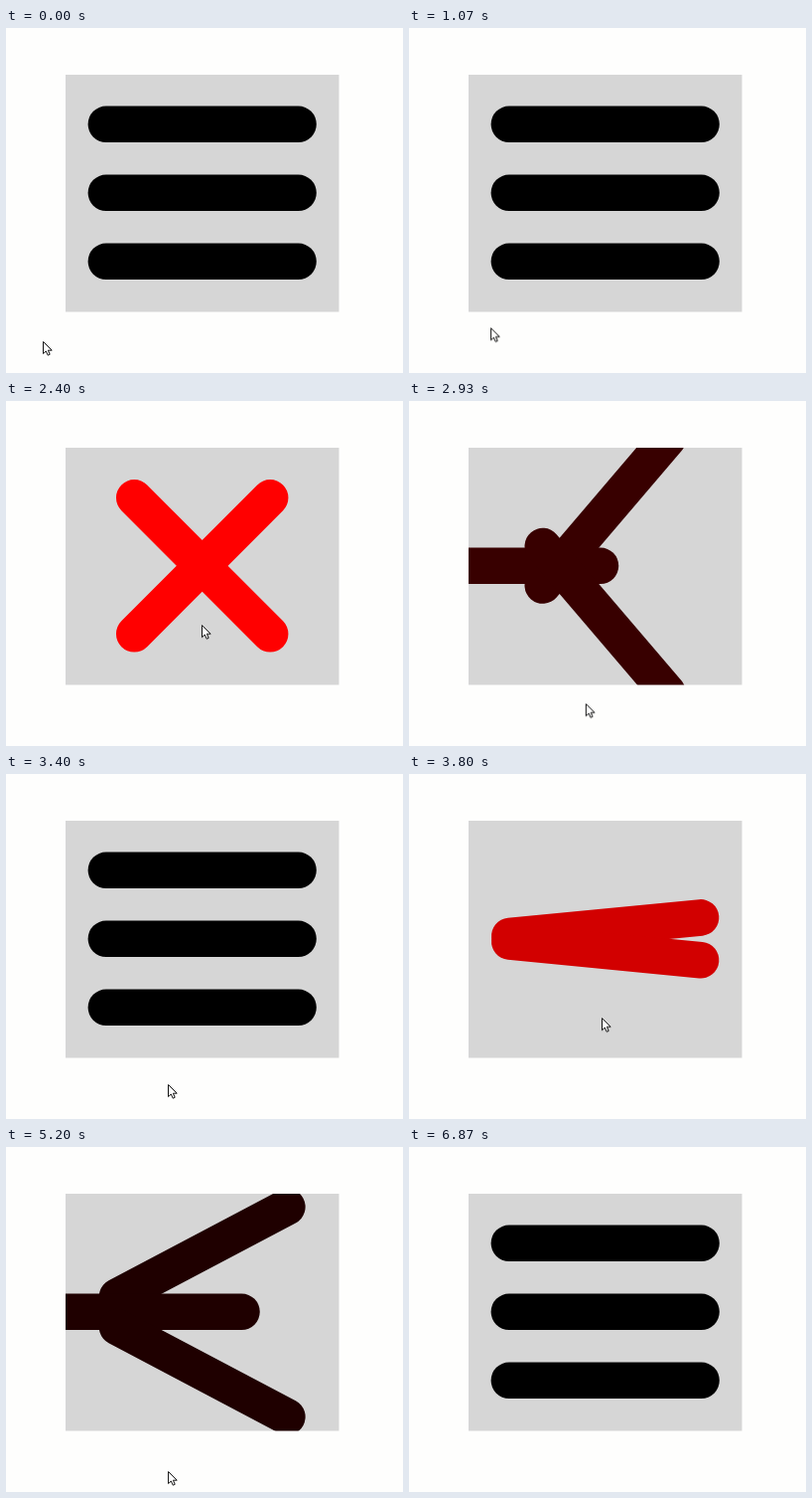
These frames come from a looping animation (400 px wide and 347 px high, 6940 ms). An HTML page:

```html
<!DOCTYPE html>
<html lang="en">
<head>
<meta charset="utf-8">
<title>Menu icon</title>
<style>
  /* 0 = menu bars, 1 = cross */
  @property --p { syntax: "<number>"; inherits: true; initial-value: 0; }

  html, body { margin: 0; width: 100%; height: 100%; overflow: hidden; background: #fefefd; }
  svg { display: block; width: 400px; height: 347px; }

  .icon { animation: toggle 6940ms infinite paused; stroke: rgb(calc(var(--p) * 255), 0, 0); }
  .bar { stroke-width: 36.6px; stroke-linecap: round; }
  .top { transform: translateY(calc(-69px + var(--p) * 69px)) rotate(calc(var(--p) * -225deg)); }
  .middle { transform: translateX(calc(var(--p) * -462px)); }
  .bottom { transform: translateY(calc(69px - var(--p) * 69px)) rotate(calc(var(--p) * 225deg)); }

  /* each change takes 300 ms and swings past both ends */
  @keyframes toggle {
    0%, 3.46%, 13.26%, 16.98%, 44.52%, 52.49%, 76.71%, 100% { --p: 0; }
    7.78%, 8.93%, 21.3%, 40.2%, 56.82%, 72.39% { --p: 1; }
    3.46%, 8.93%, 16.98%, 40.2%, 52.49%, 72.39% {
      animation-timing-function: cubic-bezier(.68, -.55, .265, 1.55);
    }
  }

  .cursor { animation: roam 6940ms linear infinite paused; }
  @keyframes roam {
    0%, 1.01% { transform: translate(37px, 315px); }
    3.46% { transform: translate(62px, 283px); }
    6.2% { transform: translate(72px, 268px); }
    8.93% { transform: translate(58px, 287px); }
    11.53% { transform: translate(37px, 321px); }
    14.41% { transform: translate(60px, 312px); }
    16.93% { transform: translate(118px, 284px); }
    19.2% { transform: translate(183px, 236px); }
    21.61%, 34.58% { transform: translate(197px, 225px); }
    38.9% { transform: translate(190px, 270px); }
    40.2% { transform: translate(185px, 287px); }
    42.22% { transform: translate(178px, 304px); }
    44.67% { transform: translate(165px, 315px); }
    48.99%, 51.44% { transform: translate(163px, 312px); }
    52.49% { transform: translate(178px, 284px); }
    54.76% { transform: translate(194px, 245px); }
    59.8% { transform: translate(120px, 170px); }
    62.39% { transform: translate(70px, 140px); }
    64.84% { transform: translate(120px, 56px); }
    68.44% { transform: translate(318px, 130px); }
    72.05% { transform: translate(200px, 297px); }
    74.93% { transform: translate(163px, 326px); }
    82.13% { transform: translate(163px, 332px); }
    85.01% { transform: translate(150px, 322px); }
    92.22%, 100% { transform: translate(-14px, 318px); }
  }
</style>
</head>
<body>
<svg viewBox="0 0 400 347">
  <clipPath id="frame"><rect x="60" y="47" width="275.5" height="238.5"/></clipPath>
  <rect x="60" y="47" width="275.5" height="238.5" fill="#d6d6d6"/>
  <g clip-path="url(#frame)">
    <g transform="translate(197.7 165.8)">
      <g class="icon">
        <path class="bar top" d="M-96.8 0H96.8"/>
        <path class="bar middle" d="M-96.8 0H96.8"/>
        <path class="bar bottom" d="M-96.8 0H96.8"/>
      </g>
    </g>
  </g>
  <path class="cursor" d="M.5 .5V12.6L3.3 10 5.2 14.2 7.2 13.3 5.4 9.2H9.2Z" fill="#fff" stroke="#111"/>
</svg>
<script>
  // The picture moves in steps, 15 a second; the lead absorbs timer jitter.
  const LOOP = 6940, STEP = 1000 / 15, LEAD = 15;
  const animations = document.getAnimations();
  const start = performance.now();

  function draw() {
    const t = (performance.now() - start + LEAD) % LOOP;
    const time = Math.floor(t / STEP) * STEP;
    for (const animation of animations) animation.currentTime = time;
    requestAnimationFrame(draw);
  }
  draw();
</script>
</body>
</html>
```
